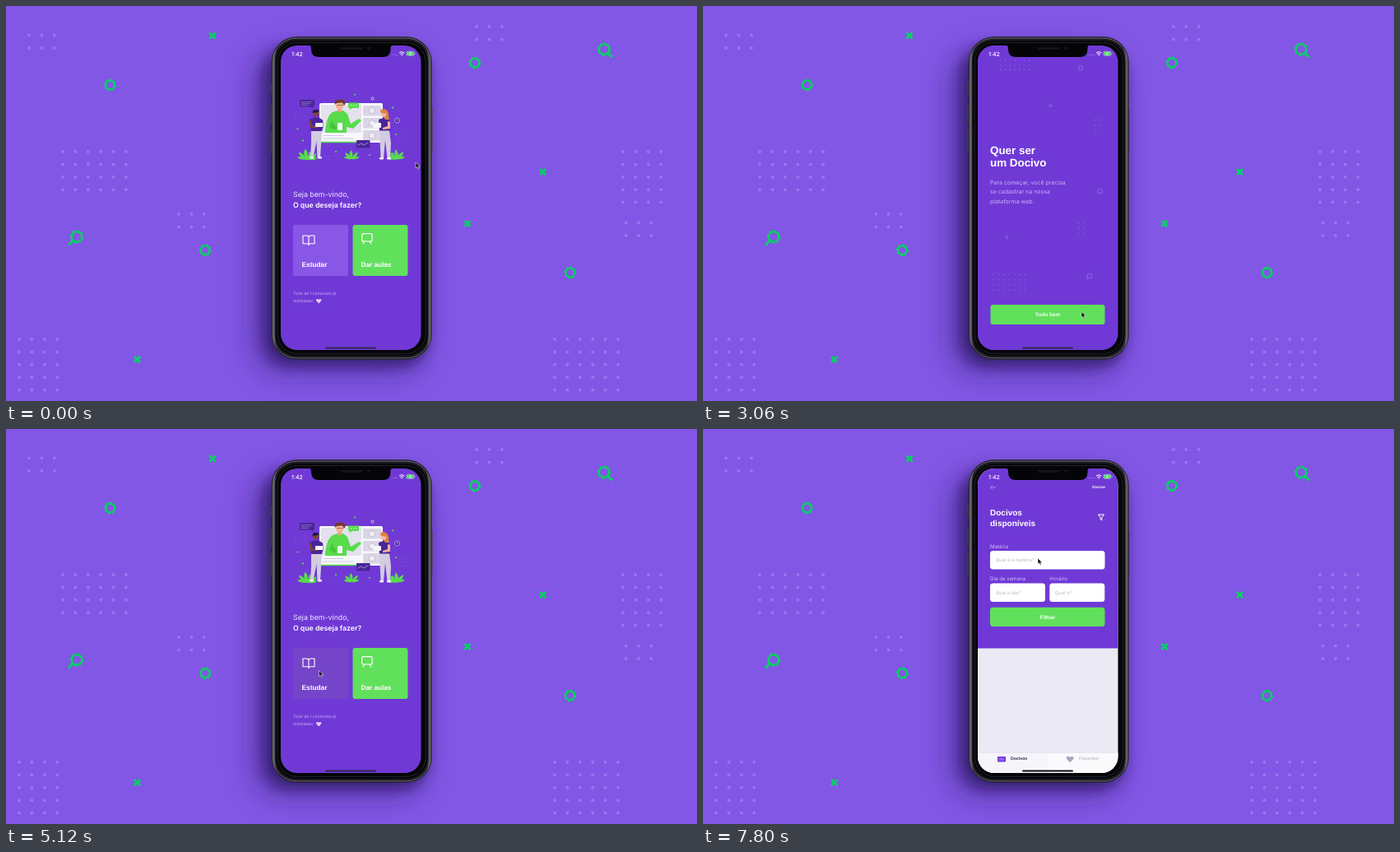
Write an HTML page that moves like this. It is 840 px wide and 480 px high and loops after 8 s.

```html
<!DOCTYPE html>
<html lang="pt">
<head>
<meta charset="utf-8">
<title>App de aulas</title>
<style>
html, body { margin: 0; width: 100%; height: 100%; overflow: hidden; background: #8257e5; }
svg { display: block; width: 840px; height: 480px; }
text { font-family: Inter, sans-serif; text-rendering: geometricPrecision; }
.b { font-family: "Liberation Sans", Arial, sans-serif; font-weight: 700; }
</style>
</head>
<body>
<svg viewBox="0 0 840 480" xmlns="http://www.w3.org/2000/svg">
<defs>
  <clipPath id="screen"><rect x="334" y="48" width="170.5" height="370" rx="20"/></clipPath>
  <filter id="soft" x="-40%" y="-30%" width="180%" height="160%"><feGaussianBlur stdDeviation="17"/></filter>
  <filter id="tight" x="-20%" y="-20%" width="140%" height="140%"><feGaussianBlur stdDeviation="7"/></filter>
  <linearGradient id="edge"><stop offset="0" stop-color="#1c0a48" stop-opacity="0"/><stop offset="1" stop-color="#1c0a48" stop-opacity=".1"/></linearGradient>
  <linearGradient id="body"><stop offset="0" stop-color="#24232a"/><stop offset=".012" stop-color="#66646f"/><stop offset=".03" stop-color="#18171d"/><stop offset=".97" stop-color="#18171d"/><stop offset=".988" stop-color="#66646f"/><stop offset="1" stop-color="#24232a"/></linearGradient>
  <path id="heart" d="M0 3.6 L-3.2 .3 C-5-2-1.8-4 0-1.7 C1.8-4 5-2 3.2 .3Z"/>
  <path id="leaf" d="M0 0Q-5-7-1-13Q4-7 0 0M0 0Q-9-3-9-9Q-2-7 0 0M0 0Q9-3 9-10Q2-7 0 0M0 0Q-8 1-11-3Q-4-5 0 0M0 0Q8 1 11-3Q4-5 0 0"/>
</defs>

<rect width="840" height="480" fill="#8257e5"/>
<g id="dots" fill="#9b75f0"></g>
<g id="marks" fill="none" stroke="#04d361"></g>

<!-- phone -->
<rect x="301" y="56" width="208" height="390" rx="34" fill="#2a1565" opacity=".52" filter="url(#soft)"/>
<rect x="314" y="48" width="199" height="389" rx="32" fill="#21104f" opacity=".55" filter="url(#tight)"/>
<g fill="#4a4852">
  <rect x="321.6" y="93" width="3" height="14" rx="1"/><rect x="321.6" y="120" width="3" height="24" rx="1"/>
  <rect x="321.6" y="151" width="3" height="29" rx="1"/><rect x="515.4" y="124" width="3" height="53" rx="1"/>
</g>
<rect x="323.2" y="37.8" width="194" height="391.4" rx="30" fill="url(#body)" stroke="#2b2931" stroke-width="1"/>
<rect x="324.6" y="39.2" width="191.2" height="388.6" rx="28.500" fill="none" stroke="#6a6873" stroke-width="1"/>
<rect x="327.4" y="41.6" width="185.6" height="383.8" rx="26" fill="#050507" stroke="#1f1e24" stroke-width="1"/>
<rect x="330.2" y="44.4" width="180" height="378" rx="23.500" fill="none" stroke="#2f2d36" stroke-width=".8"/>

<g clip-path="url(#screen)">
  <g id="home">
    <rect x="334" y="48" width="171" height="370" fill="#7039d6"/>
    <g id="art"></g>
    <text x="349" y="232" font-size="8.8" fill="#efe6ff">Seja bem-vindo,</text>
    <text x="349" y="245" font-size="8.7" font-weight="600" fill="#fff">O que deseja fazer?</text>
    <rect x="349" y="266" width="67" height="62" rx="3" fill="#8857e6"/>
    <rect id="press1" x="349" y="266" width="67" height="62" rx="3" fill="#7545c9"/>
    <rect x="421.5" y="266" width="67" height="62" rx="3" fill="#61e05c"/>
    <rect id="press0" x="421.5" y="266" width="67" height="62" rx="3" fill="#3fb04a"/>
    <g fill="none" stroke="#fff" stroke-width="1.1" stroke-linejoin="round" stroke-linecap="round">
      <path d="M361 279h4.4q2.6 0 2.6 2.2v9.2q0-1.6-2.2-1.6h-4.8zM375 279h-4.4q-2.6 0-2.6 2.2v9.2q0-1.6 2.2-1.6h4.8z"/>
      <rect x="432.6" y="276.6" width="12.6" height="9.4" rx="2"/><path d="M435.8 286l-2 3M442 286l2 3"/>
    </g>
    <text class="b" x="359.5" y="316.8" font-size="8.3" fill="#fff">Estudar</text>
    <text class="b" x="431.5" y="316.8" font-size="8.2" fill="#fff">Dar aulas</text>
    <g font-size="5" fill="#c7adf5"><text x="349" y="351.2">Total de 1 conexões já</text><text x="349" y="359.8">realizadas</text></g>
    <use href="#heart" transform="translate(380.2 358.300) scale(.86)" fill="#dcccf8"/>
  </g>

  <g id="offer">
    <rect x="326" y="48" width="8" height="370" fill="url(#edge)"/>
    <rect x="334" y="48" width="171" height="370" fill="#7039d6"/>
    <g id="deco" fill="#8a5ce4"></g>
    <g font-size="13.4" fill="#fff"><text class="b" x="349" y="180">Quer ser</text><text class="b" x="349" y="195.2">um Docivo</text></g>
    <g font-size="7" fill="#c9b1f5"><text x="349" y="217">Para começar, você precisa</text><text x="349" y="228.4">se cadastrar na nossa</text><text x="349" y="239.6">plataforma web.</text></g>
    <rect x="349.5" y="363" width="139" height="24" rx="3" fill="#61e05c"/>
    <rect id="press2" x="349.5" y="363" width="139" height="24" rx="3" fill="#3fb04a"/>
    <text class="b" x="419" y="377.2" font-size="6.5" text-anchor="middle" fill="#effff0">Tudo bem</text>
  </g>

  <g id="list">
    <rect x="326" y="48" width="8" height="370" fill="url(#edge)"/>
    <rect x="334" y="48" width="171" height="370" fill="#ebe9f4"/>
    <rect id="head" x="334" y="48" width="171" height="106" fill="#7039d6"/>
    <path d="M356 71h-6.4m2.6-2.6l-2.6 2.6 2.6 2.6" fill="none" stroke="#b595f0" stroke-width=".9"/>
    <text class="b" x="489" y="72.4" font-size="4.7" text-anchor="end" fill="#fff">Docivo</text>
    <g font-size="10" fill="#fff"><text class="b" x="349" y="104.6">Docivos</text><text class="b" x="349" y="118">disponíveis</text></g>
    <path id="funnel" d="M480.4 104h7.2l-2.8 3.6v3.2l-1.6-.9v-2.3z" fill="none" stroke="#fff" stroke-width="1" stroke-linejoin="round"/>
    <g id="form">
      <g font-size="6.2" fill="#d4c2f7"><text x="349" y="144.6">Matéria</text><text x="349" y="183.6">Dia da semana</text><text x="421.3" y="183.6">Horário</text></g>
      <g fill="#fff"><rect x="349" y="148" width="139.5" height="22.5" rx="3.5"/><rect x="349" y="187.5" width="67" height="22.5" rx="3.5"/><rect x="421.3" y="187.5" width="67" height="22.5" rx="3.5"/></g>
      <g font-size="5.7" fill="#bdb8c8"><text x="356" y="161.2">Qual é a matéria?</text><text x="356" y="200.7">Qual o dia?</text><text x="428" y="200.7">Qual é?</text></g>
      <rect x="349" y="216.8" width="139.5" height="23.2" rx="3.5" fill="#61e05c"/>
      <text class="b" x="419" y="230.6" font-size="6.5" text-anchor="middle" fill="#fff">Filtrar</text>
    </g>
    <rect x="334" y="393.5" width="86" height="25" fill="#f6f5fb"/>
    <rect x="420" y="393.5" width="85" height="25" fill="#fafafc"/>
    <path d="M334 393.5h171" stroke="#dedbe8" stroke-width=".5"/>
    <rect x="358" y="398" width="10" height="6.4" rx=".6" fill="#7039d6"/><rect x="360" y="399.6" width="6" height="3.2" fill="#8f66e8"/>
    <text class="b" x="374" y="402.4" font-size="5.2" fill="#32264d">Docivos</text>
    <use href="#heart" transform="translate(446.2 401) scale(1.2)" fill="#aca4c4"/>
    <text class="b" x="457" y="402.4" font-size="5.3" fill="#c1bccc">Favoritos</text>
  </g>

  <rect id="bar" x="388" y="414.4" width="62" height="2.2" rx="1.1"/>
  <text x="347" y="60.6" font-size="7" font-weight="500" fill="#fff">1:42</text>
  <g fill="#b79bef"><circle cx="469.5" cy="59.2" r=".5"/><circle cx="471.6" cy="59.2" r=".5"/><circle cx="473.7" cy="59.2" r=".5"/><circle cx="475.8" cy="59.2" r=".5"/></g>
  <g fill="none" stroke="#fff" stroke-width="1"><path d="M478 57q3.2-2.8 6.4 0M479.4 58.5q1.8-1.6 3.6 0"/></g><circle cx="481.2" cy="59.7" r=".7" fill="#fff"/>
  <rect x="487" y="55.3" width="9" height="5" rx="1.3" fill="#55dc6a" stroke="#b9a2ea" stroke-width=".7"/><path d="M491.8 55.6l-1.6 2.5h2.4l-1.5 2" fill="none" stroke="#fff" stroke-width=".6"/>
  <rect x="496.8" y="57" width=".8" height="1.8" fill="#b9a2ea"/>
</g>
<path d="M366 47h106q-4.5 .4-4.5 4v1.5q0 9.5-9.5 9.5H380.500q-9.500 0-9.500-9.500V51q0-3.600-5-4z" fill="#050507"/>
<rect x="407" y="50.3" width="26" height="2.4" rx="1.2" fill="#17161c"/><circle cx="441" cy="51.500" r="2" fill="#14131f"/>

<g id="cursor"><path transform="scale(.86)" d="M0 0V8.200L1.900 6.500 3.300 9.600 4.800 8.900 3.500 6H6.100Z" fill="#0b0910" stroke="#fff" stroke-width=".6" stroke-linejoin="round"/></g>
</svg>

<script>
const $ = id => document.getElementById(id);

// ---- static parts ----
const dot = (x, y, r) => `<circle cx="${x}" cy="${y}" r="${r}"/>`;
function grid(x, y, cols, rows, step, r) {
  let s = '';
  for (let i = 0; i < cols * rows; i++) s += dot(x + i % cols * step, y + Math.floor(i / cols) * step, r);
  return s;
}
const box = (x, y, w, h, fill, r = 1) => `<rect x="${x}" y="${y}" width="${w}" height="${h}" rx="${r}" fill="${fill}"/>`;
const shape = (d, fill) => `<path d="${d}" fill="${fill}"/>`;
const line = (d, color, w) => `<path d="${d}" fill="none" stroke="${color}" stroke-width="${w}" stroke-linecap="round"/>`;
const ball = (x, y, r, fill) => `<circle cx="${x}" cy="${y}" r="${r}" fill="${fill}"/>`;

$('dots').innerHTML = [
  [28, 35.5, 3, 2], [69, 177, 6, 4], [210, 253, 3, 2], [16, 405, 4, 5],
  [572, 25, 3, 2], [750, 177, 4, 5], [753.5, 263.5, 3, 2], [667, 405, 6, 5]
].map(g => grid(...g, 15.4, 2)).join('');

const cross = (x, y) => `<path d="M${x - 3.6} ${y - 3.6}l7.2 7.2m0-7.2l-7.2 7.2" stroke-width="2.8"/>`;
const gear = (x, y, r) => `<circle cx="${x}" cy="${y}" r="${r}" stroke-width="2.2"/>` +
  `<circle cx="${x}" cy="${y}" r="${r + 1.4}" stroke-width="1.4" pathLength="16" stroke-dasharray="1 1"/>`;
$('marks').innerHTML =
  [[251, 36], [652.5, 201.5], [561, 264.5], [159.5, 429.5]].map(p => cross(...p)).join('') +
  [[126.5, 96], [242.3, 296.7], [570, 69], [685.7, 324]].map(p => gear(...p, 5.4)).join('') +
  gear(86, 280.5, 6.2) + gear(727, 52.7, 6.2) +
  '<path d="M81 285l-5 5.500M732 57.500l5 5" stroke-width="2.800"/>';

$('deco').innerHTML = grid(362, 66, 7, 3, 5.7, .8) + grid(477, 138, 2, 3, 6.6, .8) +
  grid(457, 264, 2, 3, 6.4, .8) + grid(353, 326, 7, 4, 6.4, .8) +
  '<g fill="none" stroke="#8a5ce4" stroke-width="1.1"><circle cx="459" cy="75" r="2.600"/><circle cx="483" cy="225" r="2.800"/>' +
  '<circle cx="470" cy="328" r="2.800"/><path d="M468 330l-2 2.200M420 121h5m-2.500-2.500v5M367 281h5m-2.500-2.500v5"/></g>';

const green = '#58dc4c', navy = '#4a2599', pale = '#e4e1ee', pants = '#d3cce0';
const leaf = (x, y, k) => `<use href="#leaf" transform="translate(${x} ${y}) scale(${k})" fill="${green}"/>`;
$('art').innerHTML =
  `<g fill="#8657e0">${grid(352, 130, 4, 3, 4, .6)}${grid(389, 182, 5, 2, 4, .6)}${grid(477, 154, 3, 4, 4, .6)}</g>` +
  // screen with video tiles
  box(381, 118, 77, 48, '#f8f7fc', 2) + box(383, 120, 49, 34, pale) +
  [121, 136, 151].map(y => box(434, y, 22, 12.5, '#dad6e6') +
    `<circle cx="445" cy="${y + 6.3}" r="3.600" fill="#efedf6" stroke="#aca6bd" stroke-width=".6"/>`).join('') +
  line('M386 157.500h24M386 161h36', '#cfcadd', 1) + line('M383 165.500h44', green, 1.3) +
  // presenter
  shape('M388 154Q389 134 397 129L403 127 410 127 415 131 419 143 429 137 432 139 422 149 414 147 414 154Z', green) +
  shape('M403 124h5v4l-2.500 2-2.500-2z', '#e9a184') + shape('M401 117h9v6q-4.500 6-9 0z', '#f3b497') +
  shape('M400 120Q398 114 404 114Q412 112 412.500 119L411 121 409 117.500 402 118Z', '#70392c') +
  line('M403 120.500h2.500m1.500 0h2.500', '#7d4a44', .8) +
  box(403, 142, 6, 9, '#f4f2f8') + shape('M396 139l6 9-2 3-7-4z', '#46c43e') +
  // callouts
  box(416, 117.5, 13, 6.5, green) + shape('M418 123.500v3l3-3z', green) +
  [419.5, 422.5, 425.5].map(x => ball(x, 120.7, .7, '#eaffea')).join('') +
  box(357, 114, 18, 8.5, navy) + shape('M370 122l3 3v-3z', navy) +
  line('M359 116.600h13M359 118.600h11M359 120.500h8', '#a98be0', .6) +
  box(426, 163, 16.500, 9.5, navy) + line('M428 169l4-2 3 2 5-3', '#cdb7f2', .7) +
  `<circle cx="445.500" cy="112.500" r="1.500" fill="${navy}" stroke="#efe8ff" stroke-width=".9"/>` +
  `<circle cx="475.500" cy="139" r="3" fill="${navy}" stroke="#c9b1f5" stroke-width=".8"/>` + line('M475.500 137.500v1.500h1', '#fff', .5) +
  // plants
  leaf(365, 186.5, 1) + leaf(370, 187, .8) + leaf(420, 186, .85) + leaf(475, 186, .9) + leaf(471, 186.5, .7) +
  // left person
  shape('M371 151h13l-1 17-1 16h-3.500l-1-20-4 20h-3.500l1-17z', pants) + box(369, 183, 5, 2.5, '#f4f2f8') + box(379, 183, 5, 2.5, '#f4f2f8') +
  shape('M369 138l5-2.500h6l5 3 1 7-2 6.500h-13z', navy) + shape('M368 139l3 0 1 6 6 1v2.500l-8-1z', '#7c4438') +
  ball(376.5, 130.5, 3.7, '#7c4438') + shape('M372.500 130Q373 125 377 126Q381 126 380.500 129Z', '#271744') + box(376, 142, 9.5, 5, '#f7f5fb') +
  // right person
  shape('M454 151h12l2 16-1 18h-3.500l-2.500-22-2 22h-3.500z', pants) + box(454, 184, 5, 2.5, '#f4f2f8') + box(463, 184, 5, 2.5, '#f4f2f8') +
  shape('M453 138l4-1.500h5l4 3 1 12h-13z', navy) + shape('M464 140l3 1 0 8-9 1v-2l6-2z', '#f3b497') +
  shape('M455 128Q456 123.500 461 125.500Q466 128 465 134L466 138 461 138Z', '#df8140') + ball(459, 131.5, 3.3, '#f5bb9d') +
  shape('M455.500 129.500Q458 125 463 128.500L461 131Z', '#df8140') + box(446, 142, 10, 6, '#f7f5fb') +
  // confetti
  [[424, 107.5], [470, 123.5], [354.5, 149.5], [361, 163.5], [401, 177], [474, 156], [442, 181], [381, 129]].map(p => ball(...p, 1.1, green)).join('');

// ---- motion ----
const LOOP = 8000, TAU = 109;
const glide = d => {
  if (d <= 0) return 0;
  const left = Math.exp(-d / TAU);
  return left < .016 ? 1 : 1 - left;
};
const smooth = u => u * u * (3 - 2 * u);
const clamp = v => Math.max(0, Math.min(1, v));
const press = (t, a, b) => Math.min(clamp((t - a) / 90), clamp((b - t) / 90));

// time, x, y of the pointer tip
const trail = [
  [60, 498, 190], [580, 471, 296.5], [1620, 471, 296.5], [2000, 460, 314], [2760, 460, 314],
  [3040, 460, 371.5], [3660, 460, 371.5], [3990, 431, 377.5], [4040, 431, 377.5], [4430, 395, 315],
  [4480, 395, 315], [4840, 380.5, 293.5], [5780, 380.5, 293.5], [6100, 425, 99], [6200, 455, 105],
  [6380, 455, 105], [6520, 482, 106], [7440, 482, 106], [7780, 407, 157]
];
function pointer(t) {
  const i = trail.findIndex(k => k[0] > t);
  if (i === 0) return trail[0].slice(1);
  if (i < 0) return trail[trail.length - 1].slice(1);
  const [a, x, y] = trail[i - 1], [b, u, v] = trail[i], p = smooth((t - a) / (b - a));
  return [x + (u - x) * p, y + (v - y) * p];
}

const move = (id, x, y = 0) => $(id).setAttribute('transform', `translate(${x.toFixed(2)} ${y.toFixed(2)})`);
const alpha = (id, v) => $(id).setAttribute('opacity', v.toFixed(3));

function draw(t) {
  const offer = t < 3640 ? glide(t - 820) : 1 - glide(t - 3640);
  const list = glide(t - 5300);
  move('home', -51.3 * Math.max(offer, list));
  move('offer', 171 * (1 - offer));
  move('list', 171 * (1 - list));
  $('offer').style.display = offer > 0 ? '' : 'none';
  $('list').style.display = list > 0 ? '' : 'none';
  alpha('press0', .5 * press(t, 750, 960));
  alpha('press1', press(t, 4980, 5290));
  alpha('press2', .5 * press(t, 3180, 3520));
  alpha('funnel', 1 - .7 * press(t, 6560, 6800));

  const open = t >= 6740;
  $('form').style.display = open ? '' : 'none';
  $('head').setAttribute('height', open ? 218.5 : 106);
  $('bar').setAttribute('fill', list > .5 ? '#0b0a10' : '#33264f');
  move('cursor', ...pointer(t));
}

const start = performance.now();
function tick() {
  draw((performance.now() - start) % LOOP);
  requestAnimationFrame(tick);
}
draw(0);
requestAnimationFrame(tick);
</script>
</body>
</html>
```
